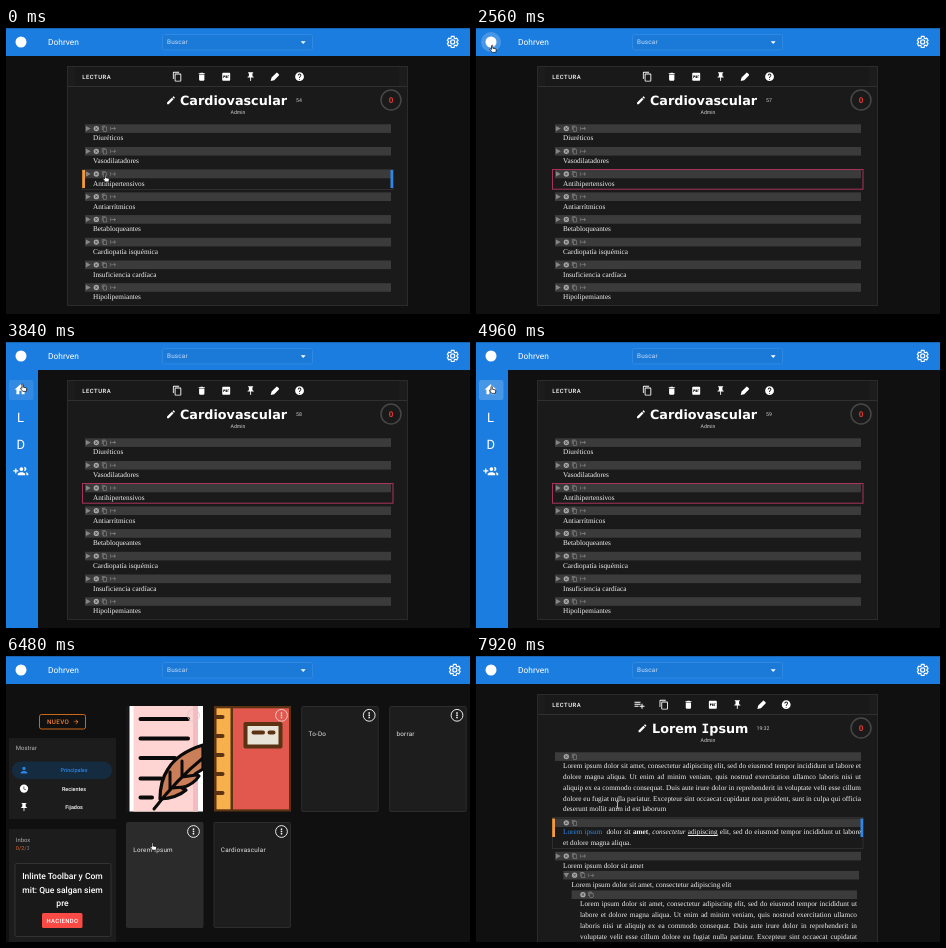
These frames come from a looping animation (464 by 286 pixels, 8000 ms). An HTML page:

```html
<!DOCTYPE html>
<html lang="es">
<head>
<meta charset="utf-8">
<title>Notas</title>
<style>
html, body { margin: 0; width: 100%; height: 100%; overflow: hidden; background: #101010; }
svg { display: block; width: 464px; height: 286px; text-rendering: geometricPrecision; }
text { font-family: Roboto, sans-serif; fill: #fff; }
.serif, .body { font-family: "Liberation Serif", serif; font-size: 7.25px; fill: #f0f0f0; color: #f0f0f0; }
.title { font-family: "DejaVu Sans", sans-serif; font-weight: 700; font-size: 12.78px; }
.mono { font-family: "DejaVu Sans Mono", monospace; }
.body { line-height: 10.87px; white-space: nowrap; }
.full { text-align: justify; text-align-last: justify; }
.body a { color: #2a8af0; }
</style>
</head>
<body>
<svg id="stage" viewBox="0 0 464 286"></svg>
<script>
const ICONS = {
  copy: 'M16 1H4c-1.1 0-2 .9-2 2v14h2V3h12V1zm3 4H8c-1.1 0-2 .9-2 2v14c0 1.1.9 2 2 2h11c1.1 0 2-.9 2-2V7c0-1.1-.9-2-2-2zm0 16H8V7h11v14z',
  trash: 'M6 19c0 1.1.9 2 2 2h8c1.1 0 2-.9 2-2V7H6v12zM19 4h-3.5l-1-1h-5l-1 1H5v2h14V4z',
  pdf: 'M5 3h14a2 2 0 0 1 2 2v14a2 2 0 0 1-2 2H5a2 2 0 0 1-2-2V5a2 2 0 0 1 2-2zM5.5 9h3.5v3.5H7V15H5.5zM10.5 9h3v6h-3zM15 9h3.5v1.5h-2V15H15z',
  pin: 'M16 9V4h1c.55 0 1-.45 1-1s-.45-1-1-1H7c-.55 0-1 .45-1 1s.45 1 1 1h1v5c0 1.66-1.34 3-3 3v2h5.97v7l1 1 1-1v-7H19v-2c-1.66 0-3-1.34-3-3z',
  pencil: 'M3 17.25V21h3.75L17.81 9.94l-3.75-3.75L3 17.25zM20.71 7.04c.39-.39.39-1.02 0-1.41l-2.34-2.34c-.39-.39-1.02-.39-1.41 0l-1.83 1.83 3.75 3.75 1.83-1.83z',
  marker: 'M2 22l2-8L14.500 3.500q1.500-1.500 3 0l3 3q1.500 1.500 0 3L10 20z',
  help: 'M12 2C6.48 2 2 6.48 2 12s4.48 10 10 10 10-4.48 10-10S17.52 2 12 2zm1 17h-2v-2h2v2zm2.07-7.75l-.9.92C13.45 12.9 13 13.5 13 15h-2v-.5c0-1.1.45-2.1 1.17-2.83l1.24-1.26c.37-.36.59-.86.59-1.41 0-1.1-.9-2-2-2s-2 .9-2 2H8c0-2.21 1.79-4 4-4s4 1.79 4 4c0 .88-.36 1.68-.93 2.25z',
  home: 'M10 20v-6h4v6h5v-8h3L12 3 2 12h3v8z',
  addUser: 'M8 10H5V7H3v3H0v2h3v3h2v-3h3v-2zm10 1a3 3 0 1 0-.91-5.86c1.2 1.7 1.2 4 0 5.72.28.09.59.14.91.14zm-5 0a3 3 0 1 0 0-6 3 3 0 0 0 0 6zm6.62 2.16c.83.73 1.38 1.66 1.38 2.84v2h3v-2c0-1.54-2.37-2.49-4.38-2.84zM13 13c-2 0-6 1-6 3v2h12v-2c0-2-4-3-6-3z',
  cancel: 'M12 2a10 10 0 1 0 0 20 10 10 0 0 0 0-20zm5 13.59L15.59 17 12 13.41 8.41 17 7 15.59 10.59 12 7 8.41 8.41 7 12 10.59 15.59 7 17 8.41 13.41 12 17 15.59z',
  user: 'M12 12a4 4 0 1 0 0-8 4 4 0 0 0 0 8zm0 2c-2.67 0-8 1.34-8 4v2h16v-2c0-2.66-5.33-4-8-4z',
  clock: 'M12 2a10 10 0 1 0 0 20 10 10 0 0 0 0-20zm4.2 14.2L11 13V7h1.5v5.2l4.5 2.7-.8 1.3z',
  addLine: 'M14 10H2v2h12v-2zm0-4H2v2h12V6zm4 8v-4h-2v4h-4v2h4v4h2v-4h4v-2h-4zM2 16h8v-2H2v2z',
  goto: 'M14.59 7.41L18.17 11H6v2h12.17l-3.59 3.59L16 18l6-6-6-6-1.41 1.41zM2 6v12h2V6H2z',
  arrow: 'M12 4l-1.41 1.41L16.17 11H4v2h12.17l-5.58 5.59L12 20l8-8z',
  more: 'M10 4h4v4h-4zM10 10h4v4h-4zM10 16h4v4h-4z',
  right: 'M4 2v20l18-10z',
  down: 'M2 4h20l-10 17z'
};

const rect = (x, y, w, h, fill, more = '') =>
  `<rect x="${x}" y="${y}" width="${w}" height="${h}" fill="${fill}" ${more}/>`;
const text = (x, y, s, size, more = '') =>
  `<text x="${x}" y="${y}" font-size="${size}" ${more}>${s}</text>`;
const mid = 'text-anchor="middle"';
const fill = c => `style="fill:${c}"`;
const icon = (name, cx, cy, size, color = '#fff') =>
  `<path d="${ICONS[name]}" fill="${color}" fill-rule="evenodd" transform="translate(${cx - size / 2} ${cy - size / 2}) scale(${size / 24})"/>`;
const serif = (x, y, s) => `<text class="serif" x="${x}" y="${y}">${s}</text>`;
const body = (x, y, w, lines) =>
  `<foreignObject x="${x}" y="${y}" width="${w + 4}" height="70"><div class="body" style="width:${w}px">${lines}</div></foreignObject>`;
const full = s => `<div class="full">${s}</div>`;
const group = (id, content) => `<g id="${id}">${content}</g>`;

// Grey strip above a note with its small controls
function bar(x, y, w, arrow, go) {
  const cy = y + 4.3;
  return rect(x, y, w, 8.6, '#3b3b3b')
    + (arrow ? icon(arrow, x + 3, cy, 6.5, '#858585') : '')
    + icon('cancel', x + 11.3, cy, 6.4, '#a8a8a8')
    + icon('copy', x + 19.5, cy, 6.2, '#989898')
    + (go ? icon('goto', x + 28, cy, 7, '#858585') : '');
}

function frame(tools, firstTool, height) {
  return rect(61.5, 38.5, 340, height, '#1a1a1a', 'stroke="#2b2b2b"')
    + rect(62, 39, 339, 19.5, '#1c1c1c')
    + rect(69, 39, 324, 19.5, '#191919')
    + rect(62, 58, 339, 1, '#303030')
    + text(76.3, 50.8, 'LECTURA', 5.9, 'font-weight="500" letter-spacing=".5"')
    + tools.map((n, i) => icon(n, firstTool + i * 24.45, 48.7, n === 'addLine' ? 12 : 10.6)).join('')
    + text(232, 85.5, 'Admin', 5.2, mid + fill('#d0d0d0'))
    + '<circle cx="385" cy="72" r="10" fill="none" stroke="#474747" stroke-width="1.5"/>'
    + `<text x="385" y="75" font-size="8" font-weight="700" ${mid} ${fill('#e53935')}>0</text>`;
}

const strips = (y, h) => rect(76.2, y, 2.8, h, '#f59a3a') + rect(384.5, y, 2.7, h, '#2f86e6');
const TOOLS = ['copy', 'trash', 'pdf', 'pin', 'marker', 'help'];
const NOTES = ['Diuréticos', 'Vasodilatadores', 'Antihipertensivos', 'Antiarrítmicos',
  'Betabloqueantes', 'Cardiopatía isquémica', 'Insuficiencia cardíaca', 'Hipolipemiantes'];

const cardio = frame(TOOLS, 171.3, 239)
  + icon('pencil', 165, 72.2, 10.5)
  + '<text class="title" x="174" y="77.2">Cardiovascular</text>'
  + text(290, 73.6, '', 5.2, 'id="count"' + fill('#ccc'))
  + NOTES.map((s, i) => bar(79, 96.3 + 22.7 * i, 306, 'right', true) + serif(87, 112.4 + 22.7 * i, s)).join('')
  + group('hover', rect(76.5, 141.5, 310.5, 20, 'none', 'stroke="#2e2e2e"') + strips(142, 18))
  + group('picked', rect(76.5, 141.5, 310.5, 19.7, 'none', 'stroke="#a8325a"'));

const lorem = frame(['addLine', ...TOOLS], 163.5, 260)
  + icon('pencil', 166.5, 72.2, 10.5)
  + '<text class="title" x="176" y="77.2">Lorem <tspan class="mono">I</tspan>psum</text>'
  + text(280.5, 73.8, '19:32', 5.2, fill('#ccc'))
  + bar(79, 96.3, 306)
  + body(87, 104.9, 298,
    full('Lorem ipsum dolor sit amet, consectetur adipiscing elit, sed do eiusmod tempor incididunt ut labore et')
    + full('dolore magna aliqua. Ut enim ad minim veniam, quis nostrud exercitation ullamco laboris nisi ut')
    + full('aliquip ex ea commodo consequat. Duis aute irure dolor in reprehenderit in voluptate velit esse cillum')
    + full('dolore eu fugiat nulla pariatur. Excepteur sint occaecat cupidatat non proident, sunt in culpa qui officia')
    + 'deserunt mollit anim id est laborum')
  + bar(79, 162.5, 306)
  + rect(76.5, 161.5, 310.5, 31, 'none', 'stroke="#2e2e2e"') + strips(162.5, 18.5)
  + body(87, 171.2, 298,
    full('<a>Lorem ipsum</a>&nbsp; dolor sit <b>amet</b>, <i>consectetur</i> <u>adipiscing</u> elit, sed do eiusmod tempor incididunt ut labore')
    + 'et dolore magna aliqua.')
  + bar(79, 195.8, 306, 'right', true) + serif(87, 212.4, 'Lorem ipsum dolor sit amet')
  + bar(87.3, 214.9, 295.7, 'down', true) + serif(95.5, 231.4, 'Lorem ipsum dolor sit amet, consectetur adipiscing elit')
  + bar(95.6, 234.4, 285.4)
  + body(104, 243.1, 277,
    full('Lorem ipsum dolor sit amet, consectetur adipiscing elit, sed do eiusmod tempor incididunt ut')
    + full('labore et dolore magna aliqua. Ut enim ad minim veniam, quis nostrud exercitation ullamco')
    + full('laboris nisi ut aliquip ex ea commodo consequat. Duis aute irure dolor in reprehenderit in')
    + full('voluptate velit esse cillum dolore eu fugiat nulla pariatur. Excepteur sint occaecat cupidatat'));

const card = (x, y, s, id = '') =>
  rect(x + .5, y + .5, 76.5, 105, '#1d1d1d', `rx="1" stroke="#2c2c2c" ${id}`) + text(x + 7.3, y + 30.3, s, 6.34, 'letter-spacing=".22"' + fill('#e6e6e6'));
const more = (x, y, c = '#fff') =>
  `<circle cx="${x}" cy="${y}" r="5.900" fill="none" stroke="${c}" stroke-width=".9"/>` + icon('more', x, y, 9, c);

const letter = rect(120, 50, 77, 105.5, '#161616') + rect(123.5, 50, 73.5, 105.5, '#fff')
  + rect(127.5, 50, 64.5, 105.5, '#ffd5d4') + rect(187, 50, 5, 105.5, '#f3bdbf')
  + '<path d="M134.500 63H182M134.500 82.500H182M134.500 102H169M134.500 122.500H155M134.500 141.500H146" stroke="#0a0a0a" stroke-width="4" stroke-linecap="round"/>'
  + '<path d="M197 89C181 94 168 103 162 113C156 122 154 131 154 143Q171 142 180 134L176 132Q188 128 193 120L189 118L197 113z" fill="#cb7f58" stroke="#0a0a0a" stroke-width="3.200" stroke-linejoin="round"/>'
  + '<path d="M148 153C158 140 176 119 197 102M166 132L178 131M176 121L190 119M164 133V116M176 120V105" fill="none" stroke="#0a0a0a" stroke-width="3" stroke-linecap="round"/>'
  + rect(197, 86, 3, 34, '#101010');

const book = rect(208, 50, 77, 105.5, '#5b3312') + rect(210.5, 52.3, 14, 101, '#f7b04b') + rect(227, 52.3, 56, 101, '#e2584f')
  + [61, 80, 99, 118, 137].map(y => rect(208, y - 2, 10.5, 4, '#5b3312', 'rx="2"')).join('')
  + rect(237.5, 66, 39, 26.5, '#5b3312', 'rx="2"') + rect(241.5, 70, 31, 18.5, '#e9e4d8')
  + '<path d="M247.500 76.500H257M263.500 76.500H267.500" stroke="#5b3312" stroke-width="4" stroke-linecap="round"/>';

const menuItem = (y, name, s, c) => icon(name, 18, y, 10, c)
  + text(68, y + 1.9, s, 5.45, `font-weight="500" ${mid} ${fill(c)}`);

const home = rect(33.5, 58.5, 46, 14.5, 'none', 'rx="2" stroke="#c8691c"')
  + text(41, 68, 'NUEVO', 6.3, 'font-weight="500" letter-spacing=".36"' + fill('#f0802a')) + icon('arrow', 70, 65.8, 7, '#f0802a')
  + rect(3, 82, 107, 81, '#1c1c1c') + text(9.8, 94.3, 'Mostrar', 6, fill('#b4b4b4'))
  + rect(6, 105.5, 100, 17.5, '#152b40', 'rx="8.7"')
  + menuItem(114.2, 'user', 'Principales', '#2a86e4')
  + menuItem(132.6, 'clock', 'Recientes', '#fff') + menuItem(151.2, 'pin', 'Fijados', '#fff')
  + rect(3, 173, 107, 113, '#1c1c1c') + text(9.8, 186, 'Inbox', 5.9, fill('#a8a8a8'))
  + text(9.8, 194.2, `0/2<tspan ${fill('#777')}>/3</tspan>`, 5.5, fill('#d9662c'))
  + rect(9, 207.5, 96, 73, '#191919', 'rx="1.5" stroke="#333"')
  + ['Inlinte Toolbar y Com', 'mit: Que salgan siem', 'pre'].map((s, i) =>
    text(56.5, 222.8 + 13.7 * i, s, 8.55, 'font-weight="500" ' + mid)).join('')
  + rect(36, 257, 40.5, 15, '#f94a45', 'rx="1.5"')
  + text(56.4, 266.7, 'HACIENDO', 5.9, `font-weight="500" letter-spacing=".36" ${mid}`)
  + letter + book + card(295.2, 50, 'To-Do') + card(383.2, 50, 'borrar')
  + card(120, 166, 'Lorem Ipsum', 'id="loremCard"') + card(207.5, 166, 'Cardiovascular')
  + more(187.5, 59.3, '#e9c5c4') + more(275.5, 59.3, '#f3d3d0') + more(363.2, 59.3) + more(451, 59.3)
  + more(187.5, 175.5) + more(275.5, 175.5);

const GEAR = 'M19.14 12.94q.12-.94 0-1.88l2.1-1.66-2.3-4-2.5 1-1.6-.94L14.4 2.5H9.6L9.2 5.46l-1.6.94-2.5-1-2.3 4 2.1 1.66q-.12.94 0 1.88L2.8 14.6l2.3 4 2.5-1 1.6.94.4 2.96h4.8l.4-2.96 1.6-.94 2.5 1 2.3-4z';
const header = rect(0, 0, 464, 28, '#1b7de0') + rect(0, 0, 464, 1, '#1765b4')
  + '<circle id="glow" cx="15" cy="14" r="10" fill="#fff" opacity=".2"/><circle cx="15" cy="14" r="5.5" fill="#fff"/>'
  + text(42, 16.9, 'Dohrven', 8.4)
  + rect(156.5, 6.5, 150, 15.5, '#1b79d8', 'rx="2" stroke="#2f88e2"')
  + text(161, 16.4, 'Buscar', 6.34, 'letter-spacing=".2"' + fill('#c6dcf6'))
  + '<path d="M294.7 13.3h5l-2.5 2.6z" fill="#fff"/>'
  + group('gear', `<g transform="translate(-7 -7) scale(.583)" fill="none" stroke="#fff" stroke-width="2"><path d="${GEAR}" stroke-linejoin="round"/><circle cx="12" cy="12" r="3.5"/></g>`);

const sidebar = rect(0, 27, 32, 259, '#1b7de0')
  + rect(3, 38, 24.5, 20, '#fff', 'id="homeGlow" rx="2"') + icon('home', 14.5, 47.5, 14)
  + text(14.6, 79.7, 'L', 13, mid) + text(14.8, 106.8, 'D', 13, mid) + icon('addUser', 14.8, 129.5, 15);

const cursor = '<path id="hand" d="M0 .6Q.6-.5 1.3.6V3.2L4 3.8Q4.9 4 4.8 5L4.3 7.4H.8L-1.6 4.5Q-1.3 3.4-.4 4L0 4.4z" fill="#fff" stroke="#000" stroke-width=".7" stroke-linejoin="round"/>'
  + '<path id="beam" d="M-1.3-3.5Q0-3.5 0-2.7Q0-3.5 1.3-3.5M0-2.7V2.7M-1.3 3.5Q0 3.5 0 2.7Q0 3.5 1.3 3.5" fill="none" stroke="#ddd" stroke-width=".8"/>';

document.getElementById('stage').innerHTML = rect(0, 0, 464, 286, '#101010')
  + group('cardio', cardio) + group('home', home) + group('lorem', lorem)
  + group('sidebar', sidebar) + header + group('cursor', cursor);

const $ = id => document.getElementById(id);
const show = (id, on) => $(id).setAttribute('display', on ? 'inline' : 'none');
const place = (id, x, y) => $(id).setAttribute('transform', `translate(${x} ${y})`);
const ease = p => p * p * (3 - 2 * p);
const ramp = (t, a, b) => ease(Math.min(1, Math.max(0, (t - a) / (b - a))));

// Pointer stops: time, x, y
const PATH = [[0, 98.5, 146.5], [1150, 98.5, 146.5], [1760, 82, 24], [2100, 15.5, 17], [2950, 15.5, 17],
  [3500, 16, 42], [4200, 16, 42], [4600, 15, 44], [5150, 15, 44], [5650, 137.5, 147.5], [5950, 137.5, 147.5],
  [6700, 148, 197], [7440, 148, 197], [7800, 141.5, 149], [8000, 141.5, 149]];

const OPENED = 5040, READ = 7440;

function draw(now) {
  const t = now % 8000;
  const atHome = t >= OPENED && t < READ;
  show('cardio', t < OPENED);
  show('home', atHome);
  show('lorem', t >= READ);
  show('hover', t < 1300);
  show('picked', t >= 640);
  $('count').textContent = 54 + Math.floor((t + 700) / 1000);

  show('glow', t > 2000 && t < 3050);
  show('sidebar', t > 2800 && t < OPENED);
  place('sidebar', -32 * (1 - ramp(t, 2800, 3050)), 0);
  $('homeGlow').setAttribute('opacity', .1 * ramp(t, 3350, 3550) + .1 * ramp(t, 4500, 4800));
  place('gear', atHome ? 448.8 : 446.7, 14);
  $('loremCard').setAttribute('fill', t > 6450 ? '#2b2b2b' : '#1d1d1d');

  const i = PATH.findIndex(p => p[0] > t);
  const [a, b] = [PATH[i - 1], PATH[i]];
  const k = ramp(t, a[0], b[0]);
  place('cursor', a[1] + (b[1] - a[1]) * k, a[2] + (b[2] - a[2]) * k);
  show('hand', t < READ);
  show('beam', t >= READ);
  requestAnimationFrame(draw);
}
draw(performance.now());
</script>
</body>
</html>
```
